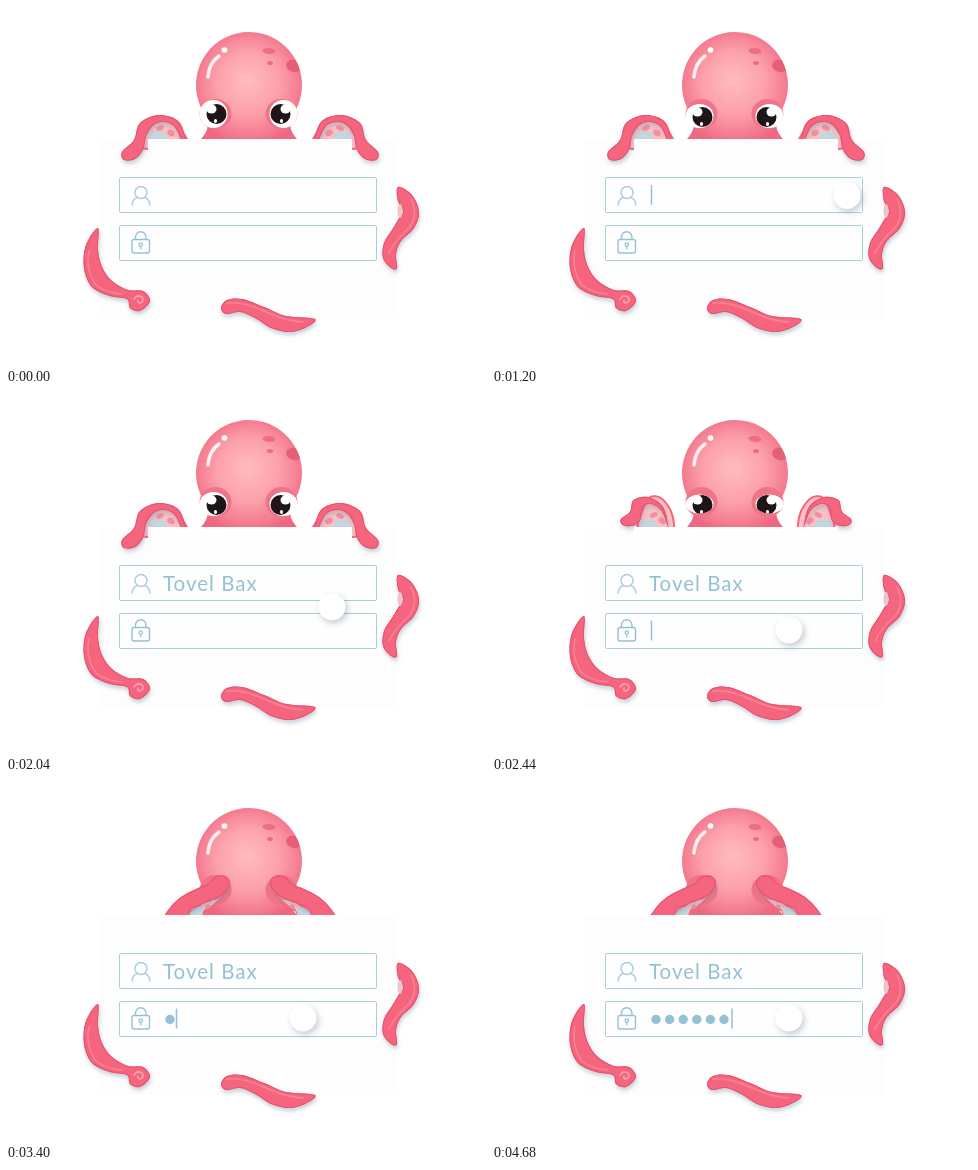
An HTML page with a canvas that plays this animation: 480 by 360 pixels, repeating every 5 s.

```html
<!DOCTYPE html>
<html lang="en">
<head>
<meta charset="utf-8">
<title>Octopus login</title>
<style>
  html, body { margin: 0; height: 100%; overflow: hidden; background: #fff; }
  canvas { display: block; }
</style>
</head>
<body>
<canvas id="stage" width="480" height="360"></canvas>
<script>
const ctx = document.getElementById('stage').getContext('2d');
const LOOP = 5000, STEP = 40;
const NAME = 'Tovel Bax';
const PINK = '#f6657e', DEEP = '#e9506e', PALE = '#fbc0c4', BLUE = '#93c2d6', LINE = '#aacdd8';

// Arm outlines run from the base along the outer edge to the tip and back.
const ARM_REST = [[181,140],[173,116],[153,109],[134,117],[128,134],[116,146],[118,154],
  [129,153],[137,144],[140,130],[145,121],[155,116],[168,120],[178,140]];
const ARM_COVER = [[156,142],[163,127],[175,115],[190,107],[202,102],[209,95],[219,94],
  [224,100],[221,108],[213,115],[204,119],[194,123],[184,129],[180,142]];
const UNDER_REST = [[136,142],[140,128],[150,116],[166,117],[178,128],[180,142]];
const UNDER_COVER = [[220,104],[214,117],[205,125],[197,130],[196,142],[172,142]];
const LEFT_LEG = [[92,222],[80,239],[78,262],[86,281],[104,290],[121,293],[124,302],
  [134,305],[144,295],[137,285],[122,284],[106,275],[96,261],[92,244]];
const RIGHT_LEG = [[392,181],[406,189],[413,206],[408,222],[395,235],[390,248],[391,262],
  [385,262],[377,252],[378,237],[386,224],[392,214],[397,205],[392,195]];
const BOTTOM_LEG = [[215,302],[221,294],[236,293],[258,301],[280,310],[309,313],
  [299,322],[283,326],[265,322],[249,312],[234,306],[220,308]];

const clamp = x => Math.min(1, Math.max(0, x));
const lerp = (a, b, k) => a + (b - a) * k;
const span = (t, from, to) => clamp((t - from) / (to - from));
const ease = k => k * k * (3 - 2 * k);

function morph(a, b, k, lift = 0) {
  return a.map(([x, y], i) => [
    lerp(x, b[i][0], k),
    lerp(y, b[i][1], k) - lift * Math.sin(Math.PI * k) * Math.sin(Math.PI * i / (a.length - 1))
  ]);
}

// Closed smooth curve through all points.
function trace(points) {
  const n = points.length, at = i => points[(i + n) % n];
  ctx.beginPath();
  ctx.moveTo(...points[0]);
  for (let i = 0; i < n; i++) {
    const [p, a, b, q] = [at(i - 1), at(i), at(i + 1), at(i + 2)];
    ctx.bezierCurveTo(a[0] + (b[0] - p[0]) / 6, a[1] + (b[1] - p[1]) / 6,
      b[0] - (q[0] - a[0]) / 6, b[1] - (q[1] - a[1]) / 6, b[0], b[1]);
  }
}

function shadow(color, blur, x, y) {
  ctx.shadowColor = color;
  ctx.shadowBlur = blur;
  ctx.shadowOffsetX = x;
  ctx.shadowOffsetY = y;
}

function oval(x, y, rx, ry, fill, turn = 0) {
  ctx.beginPath();
  ctx.ellipse(x, y, rx, ry, turn, 0, 7);
  ctx.fillStyle = fill;
  ctx.fill();
}

function strokePath(d, color, width) {
  ctx.strokeStyle = color;
  ctx.lineWidth = width;
  ctx.lineCap = 'round';
  ctx.stroke(new Path2D(d));
}

function tentacle(points) {
  ctx.save();
  trace(points);
  shadow('rgba(110,140,160,.4)', 4, 1, 3);
  ctx.fillStyle = PINK;
  ctx.fill();
  shadow('transparent', 0, 0, 0);
  ctx.clip();
  ctx.strokeStyle = DEEP;
  ctx.lineWidth = 2;
  ctx.stroke();
  ctx.restore();
}

function mirrored(draw) {
  draw();
  ctx.save();
  ctx.translate(488, 0);
  ctx.scale(-1, 1);
  draw();
  ctx.restore();
}

function head() {
  const skin = ctx.createRadialGradient(241, 74, 4, 243, 79, 60);
  skin.addColorStop(0, '#ffb9bb');
  skin.addColorStop(.5, '#fca0aa');
  skin.addColorStop(.85, '#f47b90');
  skin.addColorStop(1, '#ee6882');
  ctx.save();
  ctx.beginPath();
  ctx.arc(243, 79, 53, Math.PI * 5 / 6, Math.PI / 6);
  ctx.bezierCurveTo(282, 117, 283, 124, 291, 133);
  ctx.lineTo(195, 133);
  ctx.bezierCurveTo(203, 124, 204, 117, 197, 105.5);
  ctx.fillStyle = skin;
  ctx.fill();
  ctx.clip();
  oval(263, 45, 6.5, 3, '#ec6d84', .1);
  oval(264, 57, 3, 2, '#ec6d84');
  oval(288, 60, 8, 6, '#e65f79', .3);
  oval(238, 28, 6, 2, '#f07f93');
  ctx.restore();
  strokePath('M202 71Q203 57 213 50', '#fff0f0', 3.5);
  oval(218.5, 44, 2.8, 2.8, '#fff');
}

function eye(look, shut) {
  oval(211, 108, 16, 15, '#ef7389');
  if (shut >= 1) return;
  ctx.save();
  ctx.beginPath();
  ctx.ellipse(209, 108 + look * 2, 14, (14 - look * 2) * (1 - shut), 0, 0, 7);
  ctx.fillStyle = '#fff';
  ctx.fill();
  ctx.clip();
  const y = 108 + look * 3;
  oval(212, y, 10, 10, '#1d1517');
  oval(207, y - 5, 5, 4.5, '#fff');
  oval(211, y + 7, 1.6, 2, '#fff');
  ctx.restore();
}

function arm(k) {
  ctx.save();
  ctx.beginPath();
  ctx.rect(0, 0, 488, 133);
  ctx.rect(100, 132, 42, 32);
  ctx.clip();
  ctx.save();
  trace(morph(UNDER_REST, UNDER_COVER, k, 35));
  ctx.fillStyle = PALE;
  ctx.fill();
  ctx.strokeStyle = PINK;
  ctx.lineWidth = 2;
  ctx.stroke();
  ctx.clip();
  oval(lerp(152, 190, k), 131, 9, 6, '#c3d5de');
  oval(lerp(154, 211, k), lerp(122, 115, k), 4, 2.5, '#f58f9b', -.4);
  oval(lerp(165, 203, k), lerp(127, 126, k), 4, 3, '#f58f9b', .6);
  ctx.restore();
  tentacle(morph(ARM_REST, ARM_COVER, k, 35));
  ctx.restore();
}

function form() {
  ctx.fillStyle = '#fdfdfd';
  ctx.fillRect(92, 133, 300, 180);
  ctx.fillStyle = '#fefefe';
  ctx.strokeStyle = LINE;
  ctx.lineWidth = 1;
  for (const y of [171.5, 219.5]) {
    ctx.beginPath();
    ctx.roundRect(113.5, y, 257, 35, 1);
    ctx.fill();
    ctx.stroke();
  }
  strokePath('M141 186.5a6 6 0 1 1-12 0a6 6 0 1 1 12 0M126 199Q127 192 132 191.5M138 191.5Q143 192 144 199', LINE, 1.4);
  strokePath('M128 233.5h13.500q2 0 2 2v9.500q0 2-2 2h-13.500q-2 0-2-2v-9.500q0-2 2-2zM129.500 233v-2a5.200 5.200 0 0 1 10.400 0v2', BLUE, 1.4);
  strokePath('M136.500 238.500a1.700 1.700 0 1 1-3.400 0a1.700 1.700 0 1 1 3.400 0M134.800 240.500v2.500', BLUE, 1.2);
}

function caret(x, y) {
  ctx.fillStyle = BLUE;
  ctx.fillRect(x - .75, y - 10, 1.5, 20);
}

function entries(t) {
  // Letters and dots appear once the caret has passed them.
  const nameCaret = lerp(159.5, 255, span(t, 1200, 1840));
  ctx.font = '20.5px Lato, sans-serif';
  ctx.letterSpacing = '1px';
  ctx.fillStyle = BLUE;
  let shown = 0;
  while (shown < NAME.length && 157 + ctx.measureText(NAME.slice(0, shown + 1)).width < nameCaret) shown++;
  if (t >= 1840) shown = NAME.length;
  ctx.fillText(NAME.slice(0, shown), 157, 197);
  if (t >= 640 && t < 1840) caret(nameCaret, 189);

  const dotCaret = 159.5 + 55 * span(t, 3200, 4200) + 25.500 * span(t, 4400, 4680);
  for (let x = 164; x < 235; x += 13.6) {
    if (x + 5 < dotCaret) oval(x, 237.5, 4.7, 4.7, BLUE);
  }
  if (t >= 2400) caret(dotCaret, 236.5);
}

function pointer(t) {
  if (t < 320) return;
  const enter = ease(span(t, 320, 680)), move = ease(span(t, 1800, 2280));
  ctx.save();
  shadow('rgba(90,110,125,.35)', 6, 2, 3);
  oval(lerp(500, 355, enter) - 58 * move, lerp(235, 189.5, enter) + 46.5 * move, 13.5, 13.5, '#fff');
  ctx.restore();
}

function draw(t) {
  const look = ease(span(t, 320, 680)), cover = ease(span(t, 2320, 2840));
  ctx.clearRect(0, 0, 480, 360);
  head();
  ctx.save();
  ctx.translate(-1.500, 0);
  ctx.restore();
  mirroredEyes(look, cover);
  form();
  tentacle(LEFT_LEG);
  strokePath('M128 293q3-5 8-2q3 4-2 6q-3 0-2-3', '#fba3ae', 1.5);
  strokePath('M83 245Q79 264 90 279Q100 287 116 288', '#fa8496', 1.5);
  tentacle(RIGHT_LEG);
  oval(394, 205, 2.5, 7, '#e8c6cc');
  strokePath('M405 193Q413 209 403 222Q390 233 383 247', '#fa8496', 1.5);
  tentacle(BOTTOM_LEG);
  strokePath('M221 297Q237 295 258 305T297 316', '#fa8496', 1.5);
  mirrored(() => arm(cover));
  entries(t);
  pointer(t);
}

function mirroredEyes(look, cover) {
  ctx.save();
  ctx.translate(-1.5, 0);
  ctx.beginPath();
  ctx.rect(190, 90, 110, 43);
  ctx.clip();
  mirrored(() => eye(look, clamp(cover * 1.6)));
  ctx.restore();
}

function tick() {
  const t = performance.now() % LOOP;
  draw(Math.floor(t / STEP) * STEP);
  requestAnimationFrame(tick);
}
tick();
</script>
</body>
</html>
```
